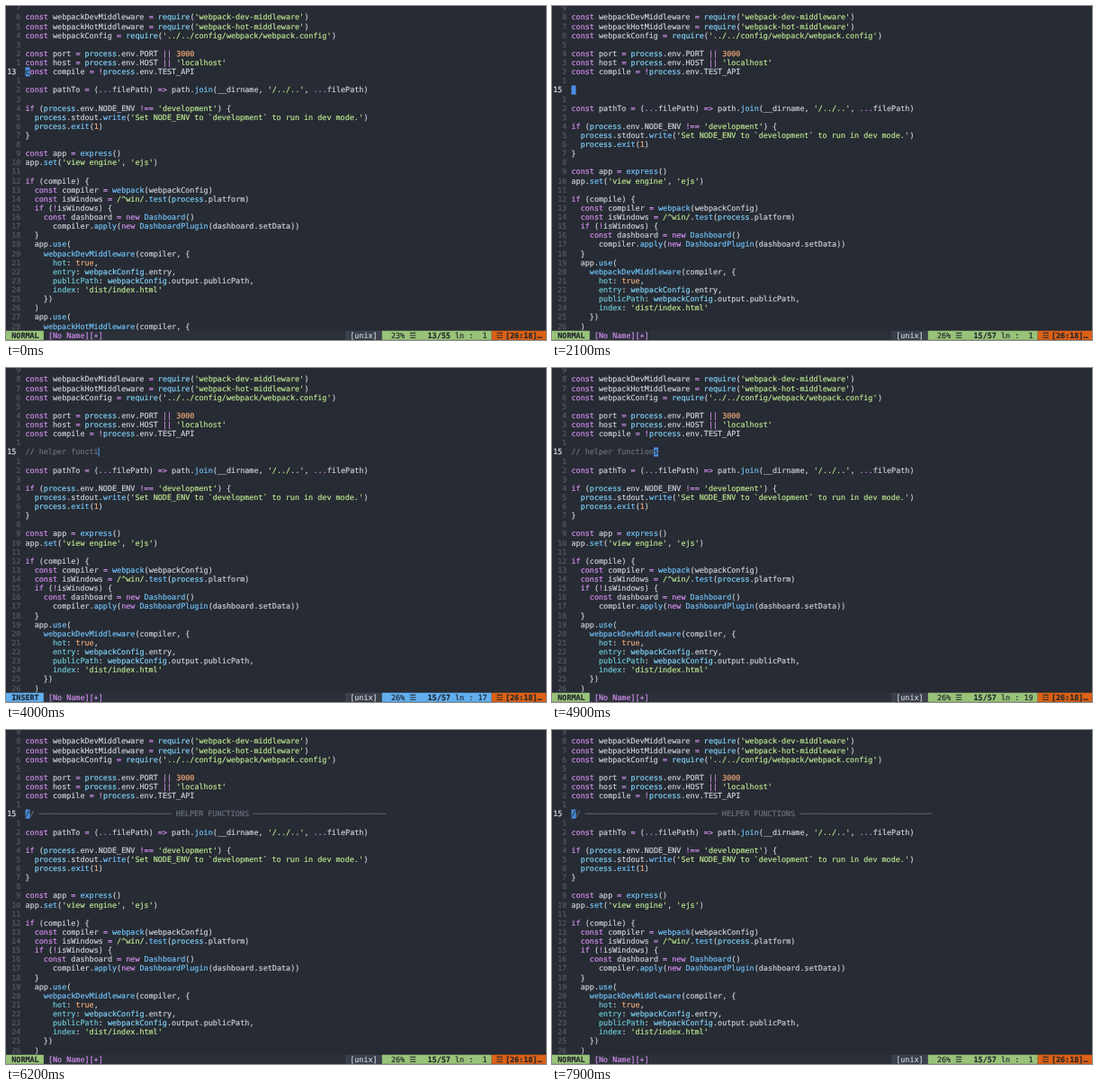
Recreate the animation shown at these times as an HTML page. Size 600 px wide and 372 px high, loop 8 s.

```html
<!DOCTYPE html>
<html lang="en">
<head>
<meta charset="utf-8">
<title>Editor: comment banner</title>
<style>
  html, body { margin: 0; width: 100%; height: 100%; overflow: hidden; background: #272b33; }
  svg { display: block; width: 600px; height: 372px; }
  text {
    font: 8.44px "DejaVu Sans Mono", "DejaVu Sans", monospace;
    white-space: pre;
    text-rendering: geometricPrecision;
    stroke-width: 0.18px;
  }
  .bold { font-weight: bold; }
</style>
</head>
<body>
<svg id="screen" viewBox="0 0 600 372"></svg>
<script>
const LOOP = 8000;
const CELL = 5.08, PITCH = 10.12, LEFT = 1.2, TOP = -2.6, BASE = 7.9;
const ROWS = 36, FIRST_LINE = 6, GUTTER = 4;

const color = {
  bg: '#272b33', text: '#cdd2da', dim: '#555b66', current: '#dde1e7', comment: '#6a717d',
  string: '#bde892', keyword: '#d48ff0', number: '#f0a878', call: '#72c4fb', global: '#80d4fa',
  key: '#6ccbd8', cursor: '#4a90e2', bar: '#2b3039', chip: '#3a404b', normal: '#98c379',
  insert: '#61afef', warn: '#dc6116', ink: '#22262d'
};

const before = `
const webpackDevMiddleware = require('webpack-dev-middleware')
const webpackHotMiddleware = require('webpack-hot-middleware')
const webpackConfig = require('../../config/webpack/webpack.config')

const port = process.env.PORT || 3000
const host = process.env.HOST || 'localhost'
const compile = !process.env.TEST_API`.split('\n');

const after = `
const pathTo = (...filePath) => path.join(__dirname, '/../..', ...filePath)

if (process.env.NODE_ENV !== 'development') {
  process.stdout.write('Set NODE_ENV to \`development\` to run in dev mode.')
  process.exit(1)
}

const app = express()
app.set('view engine', 'ejs')

if (compile) {
  const compiler = webpack(webpackConfig)
  const isWindows = /^win/.test(process.platform)
  if (!isWindows) {
    const dashboard = new Dashboard()
      compiler.apply(new DashboardPlugin(dashboard.setData))
  }
  app.use(
    webpackDevMiddleware(compiler, {
      hot: true,
      entry: webpackConfig.entry,
      publicPath: webpackConfig.output.publicPath,
      index: 'dist/index.html'
    })
  )
  app.use(
    webpackHotMiddleware(compiler, {`.split('\n');

const comment = '// helper functions';
const rule = '─'.repeat(29);
const banner = `// ${rule} HELPER FUNCTIONS ${rule}`;

const syntax = new RegExp([
  /(?<comment>\/\/.*)/,
  /(?<string>'[^']*'|\/\^win\/)/,
  /(?<keyword>\b(?:const|if|new)\b|=>|!==|\|\||\.\.\.|[=!])/,
  /(?<number>\b(?:\d+|true)\b)/,
  /(?<global>\b(?:process|require)\b|(?<=: )\w+)/,
  /(?<call>\w+(?=\())/,
  /(?<key>\w+(?=:))/,
  /(?<text>\w+|[^\s\w])/
].map(r => r.source).join('|'), 'g');

const screen = document.getElementById('screen');
const colX = c => LEFT + c * CELL;
const rowY = r => TOP + r * PITCH;

function add(name, attrs, content) {
  const el = document.createElementNS('http://www.w3.org/2000/svg', name);
  for (const k in attrs) el.setAttribute(k, attrs[k]);
  if (content) el.textContent = content;
  screen.append(el);
}

function put(col, row, str, fill, bold) {
  add('text', {
    x: colX(col), y: rowY(row) + BASE, fill, stroke: fill, class: bold ? 'bold' : ''
  }, str);
}

function box(x1, x2, row, fill) {
  add('rect', { x: x1, y: rowY(row), width: x2 - x1, height: PITCH, fill });
}

function putCode(row, line) {
  for (const m of line.matchAll(syntax)) {
    const kind = Object.keys(m.groups).find(k => m.groups[k]);
    put(GUTTER + m.index, row, m[0], color[kind]);
  }
}

function stateAt(t) {
  const s = { line: 13, added: 0, col: 1, insert: false, note: '' };
  if (t >= 1600) { s.line = 14; s.added = 1; }
  if (t >= 1800) { s.line = 15; s.added = 2; }
  if (t >= 2300) {
    const typed = Math.floor((t - 2500) / 100) + 1;
    s.note = comment.slice(0, Math.max(0, typed));
    s.insert = t < 4700;
    s.col = s.insert ? s.note.length + 1 : comment.length;
  }
  if (t >= 5500) { s.note = banner; s.col = 1; }
  return s;
}

function drawCursor(s, row, line) {
  const col = GUTTER + s.col - 1, x = colX(col);
  if (s.insert) return box(x - 0.3, x + 0.9, row, color.cursor);
  box(x, x + CELL, row, color.cursor);
  put(col, row, line[s.col - 1] || '', color.ink);
}

function drawStatus(s) {
  const row = ROWS, accent = s.insert ? color.insert : color.normal;
  const total = 55 + s.added;
  add('rect', { x: 0, y: rowY(row), width: 600, height: 12, fill: color.bar });
  box(0, colX(8), row, accent);
  box(colX(74), colX(82), row, color.chip);
  box(colX(82), colX(106), row, accent);
  box(colX(106), 600, row, color.warn);
  put(1, row, s.insert ? 'INSERT' : 'NORMAL', color.ink, true);
  put(9, row, '[No Name][+]', color.keyword);
  put(75, row, '[unix]', color.text);
  put(84, row, Math.floor(s.line / total * 100) + '%', color.ink);
  put(88, row, '☰', color.ink);
  put(92, row, `${s.line}/${total}`, color.ink, true);
  put(98, row, 'ln', color.ink);
  put(101, row, ':', color.ink);
  put(103, row, String(s.col).padStart(2), color.ink);
  put(107, row, '☲', color.ink, true);
  put(109, row, '[26:18]…', color.ink, true);
}

function draw(s) {
  const gap = ['', s.note].slice(0, s.added);
  const lines = [...before, ...gap, ...after];
  screen.replaceChildren();
  for (let row = 0; row < ROWS; row++) {
    const away = Math.abs(FIRST_LINE + row - s.line);
    if (away) put(0, row, String(away).padStart(3), color.dim);
    else put(0, row, String(s.line), color.current);
    putCode(row, lines[row]);
    if (!away) drawCursor(s, row, lines[row]);
  }
  drawStatus(s);
}

let shown = '';
const start = performance.now();
function tick() {
  const s = stateAt((performance.now() - start) % LOOP);
  const id = JSON.stringify(s);
  if (id !== shown) { shown = id; draw(s); }
  requestAnimationFrame(tick);
}
tick();
</script>
</body>
</html>
```
